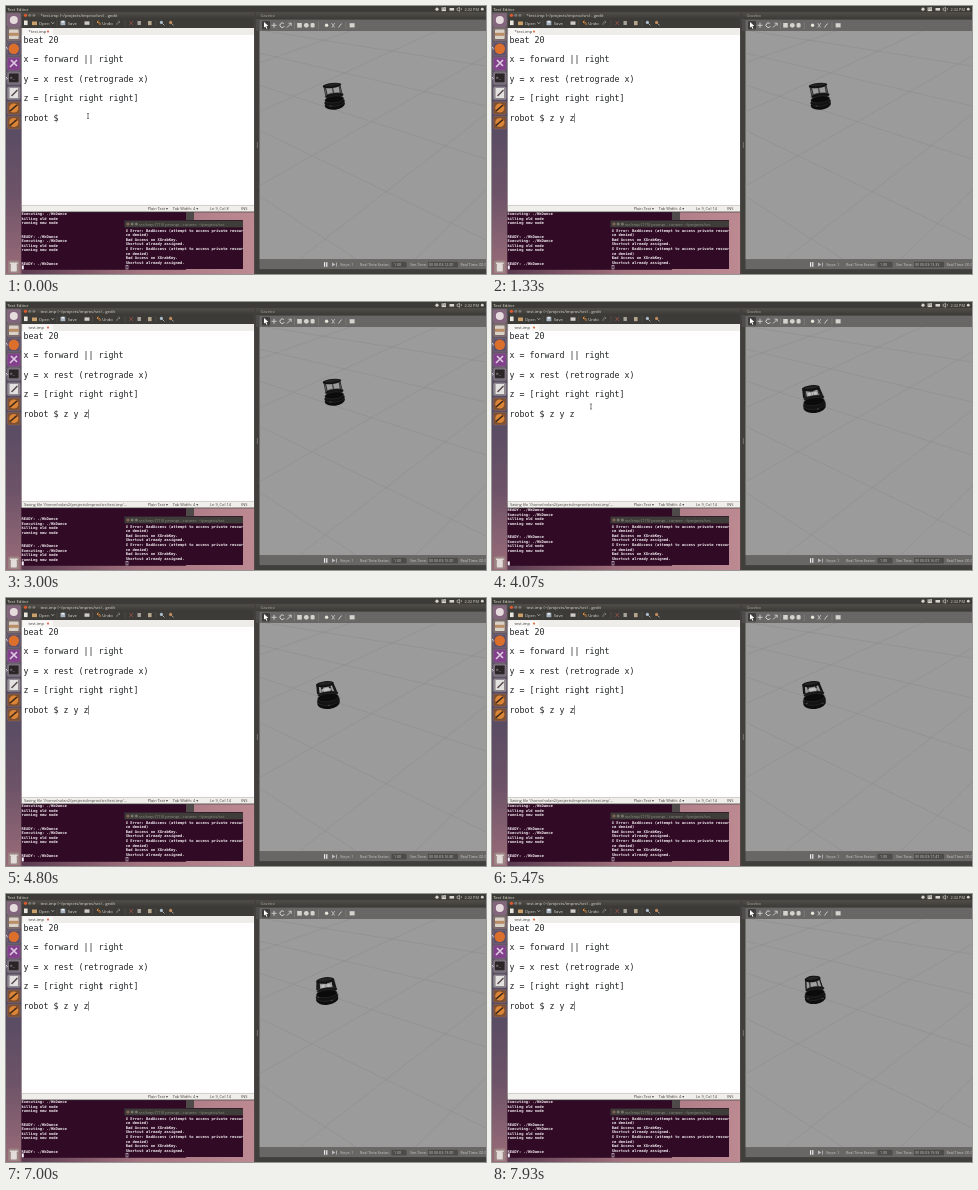
These frames come from a looping animation (480x268 px, 8 s). An HTML page:

```html
<!DOCTYPE html>
<html lang="en">
<head>
<meta charset="utf-8">
<title>Live coding a robot</title>
<style>
html, body { margin: 0; width: 100%; height: 100%; overflow: hidden; background: #3c3b37; }
svg { display: block; width: 480px; height: 268px; }
text { white-space: pre; font-family: "Open Sans", "Noto Sans", sans-serif; }
.mono { font-family: "DejaVu Sans Mono", "Liberation Mono", monospace; }
#blink { animation: blink 8s step-end infinite; }
#mouse { animation: mouse 8s linear infinite; }
#log { animation: scroll 8s step-end infinite; }
@keyframes blink {
  0%, 32.5%, 47.5%, 62.5%, 77.5%, 92.5% { opacity: 0; }
  4.125%, 37.5%, 52.5%, 67.5%, 82.5%, 97.5%, 100% { opacity: 1; }
}
@keyframes mouse {
  0%, 4.12% { transform: translate(82px, 110px); opacity: 1; }
  4.13% { transform: translate(82px, 110px); opacity: 0; }
  48% { transform: translate(99px, 104.5px); opacity: 0; }
  48.01%, 54% { transform: translate(99px, 104.5px); opacity: 1; }
  56.6%, 100% { transform: translate(95px, 92.5px); opacity: 1; }
}
@keyframes scroll {
  0% { transform: translateY(0); }
  32.5% { transform: translateY(-4.5px); }
  33.75% { transform: translateY(-13.5px); }
  45% { transform: translateY(-22.5px); }
  55%, 100% { transform: translateY(-27px); }
}
</style>
</head>
<body>
<svg id="stage" viewBox="0 0 480 268" xmlns="http://www.w3.org/2000/svg"></svg>
<script>
const LOOP = 8000;
const rect = (x, y, w, h, fill, more = '') =>
  `<rect x="${x}" y="${y}" width="${w}" height="${h}" fill="${fill}" ${more}/>`;
const disc = (x, y, r, fill) => `<circle cx="${x}" cy="${y}" r="${r}" fill="${fill}"/>`;
const text = (x, y, s, size, fill, more = '') =>
  `<text x="${x}" y="${y}" font-size="${size}" fill="${fill}" ${more}>${s}</text>`;
const mono = (x, y, s, size, fill, more = '') => text(x, y, s, size, fill, 'class="mono" ' + more);
const path = (d, color, width = 0.7) =>
  `<path d="${d}" fill="none" stroke="${color}" stroke-width="${width}"/>`;
const buttons = (x, y, close) =>
  disc(x, y, 1.6, close) + disc(x + 4.2, y, 1.5, '#77756e') + disc(x + 8.4, y, 1.5, '#77756e');

function desktop() {
  return `<defs>
    <linearGradient id="wall" x2="0" y2="1"><stop stop-color="#6b5f66"/><stop offset=".4" stop-color="#544a62"/><stop offset=".7" stop-color="#6d5368"/><stop offset="1" stop-color="#9a6c78"/></linearGradient>
    <linearGradient id="low"><stop stop-color="#5a3a50"/><stop offset=".5" stop-color="#a3737f"/><stop offset="1" stop-color="#bd8a92"/></linearGradient>
    <linearGradient id="bar" x2="0" y2="1"><stop stop-color="#504e48"/><stop offset="1" stop-color="#3c3b37"/></linearGradient>
    <clipPath id="logClip"><rect x="15" y="206" width="104" height="53.8"/></clipPath>
    <clipPath id="view"><rect x="253.5" y="25" width="226.5" height="228.5"/></clipPath></defs>`
    + rect(0, 0, 480, 268, 'url(#wall)') + rect(15.4, 200, 233, 68, 'url(#low)')
    + rect(0, 0, 480, 6.3, '#3c3b37')
    + text(1.2, 4.7, 'Text Editor', 4.3, '#dfdbd2')
    + disc(431, 3.2, 1.6, '#d8d4cb')
    + rect(435.6, 1.3, 4.4, 3.8, '#d8d4cb') + text(436.2, 4.4, 'En', 2.9, '#3c3b37')
    + rect(443.5, 2, 4.6, 2.6, '#d8d4cb') + path('M451 2.3v2h1l1.5 1v-4l-1.5 1zM455 2q1 1.2 0 2.4', '#d8d4cb', .6)
    + text(458.6, 4.8, '2:32 PM', 3.8, '#dfdbd2') + disc(476.3, 3.2, 1.4, '#d8d4cb');
}

function launcher() {
  const tile = (y, fill) => rect(1.4, y - 6.2, 12.8, 12.8, fill, 'rx="1.6" stroke="#b9a5ac" stroke-opacity=".35" stroke-width=".5"');
  return tile(14, '#82647c') + disc(7.8, 14, 4, '#e6dcde')
    + tile(28, '#7a6a68') + rect(3, 23.6, 9.6, 9.4, '#d9d2c8', 'rx=".8"') + rect(3, 26.8, 9.6, 3, '#b98c66')
    + tile(42.8, '#5d506a') + disc(7.8, 42.8, 5.2, '#dc6f2b')
    + tile(57.6, '#82408c') + path('M4 61l7-7M5 54l6 6', '#dcc9e0', 1.7)
    + tile(72, '#77707a') + rect(3, 67.5, 9.6, 8.8, '#2b2528', 'rx=".8"') + mono(4, 73, '&gt;_', 4, '#eee')
    + tile(87, '#8f8a90') + rect(3.6, 82, 8.4, 10, '#e4e2e0') + path('M5.5 90l6-6', '#55474c', 1.5)
    + [102, 116.5].map(y => tile(y, '#7d5034') + disc(7.8, y, 4.6, '#d98436') + path(`M4 ${y + 3}l7-6`, '#3a2518', 1.6)).join('')
    + rect(2.2, 254.5, 11.2, 12.5, '#9c8584', 'rx="1.6"') + rect(4.8, 258, 6, 7.5, '#e2dcda', 'rx=".8"')
    + rect(4, 256.6, 7.6, 1.2, '#f1eeec')
    + path('M0 41l1.3 1.3L0 43.6M0 71l1.3 1.3L0 73.6', '#eee', .8);
}

function terminals() {
  const block = ['Executing: ./HkDance', 'killing old node', 'running new node', '', '', 'READY: ./HkDance'];
  let log = '';
  for (let i = 0; i < 18; i++) log += mono(15.6, 209 + i * 4.5, block[i % 6], 3.75, '#f3eef1', 'font-weight="bold"');
  const err = ['X Error: BadAccess (attempt to access private resour', 'ce denied)', 'Bad Access on XGrabKey.', 'Shortcut already assigned.'];
  let side = '';
  for (let i = 0; i < 8; i++) side += mono(119.8, 225.7 + i * 4.56, err[i % 4], 3.75, '#f3eef1', 'font-weight="bold"');
  return rect(15.4, 206, 164.6, 57.8, '#310b26') + rect(180, 206, 8, 9, '#4f4a4a')
    + rect(118.5, 214, 118.5, 49, '#310b26')
    + `<g clip-path="url(#logClip)"><g id="log">${log}</g></g>`
    + rect(15.7, 259.4, 2.1, 4, '#f3eef1')
    + rect(118.5, 214.6, 118.5, 6.8, '#3e3d39') + buttons(122, 218, '#8a6254')
    + text(133, 219.5, 'src/tmp (115) prompt - runner: ~/projects/src', 4.1, '#8f8b83')
    + side + rect(120, 259.6, 2, 3.4, 'none', 'stroke="#f3eef1" stroke-width=".5"');
}

function editor() {
  const code = ['beat 20', 'x = forward || right', 'y = x rest (retrograde x)', 'z = [right right right]'];
  const ink = '#d9d5cb', sep = x => path(`M${x} 14v6.5`, '#5a5851', .5);
  return rect(15.6, 6.3, 232.6, 200, '#3c3b37') + rect(15.6, 6.3, 232.6, 6.2, 'url(#bar)')
    + buttons(19.5, 9.3, '#e2582f') + text(34.4, 10.6, '', 4.2, ink, 'id="title"')
    + rect(18, 14.5, 3.6, 4.6, '#e8e5de') + rect(26, 15.5, 5, 3.6, '#c9a06a') + text(32.8, 18.6, 'Open', 4.2, ink)
    + path('M45.5 16.3l1.3 1.4 1.3-1.4', ink) + sep(51)
    + rect(54.5, 14.8, 4.8, 4.4, '#a8b3c2') + rect(55.7, 14.8, 2.4, 1.8, '#ecebe8') + text(61.8, 18.6, 'Save', 4.2, ink)
    + rect(78.5, 15.4, 5, 3.4, '#cfccc5') + sep(86.5)
    + path('M94 19q1-3-3-3l1.4-1.4M91 16l1.4 1.4', '#d98a3c', 1) + text(96.2, 18.6, 'Undo', 4.2, ink)
    + path('M111 19q-1-3 3-3l-1.4-1.4M114 16l-1.4 1.4', '#7f7d74', .9) + sep(119)
    + path('M123.4 15l3.6 4M127 15l-3.6 4', '#a8564a') + rect(131.5, 15, 3.4, 4, '#a5a29a') + rect(142, 15, 3.6, 4.2, '#b5a58b') + sep(150)
    + disc(155.4, 16.4, 1.6, '#a9bac9') + path('M156.6 17.6l1.8 1.8', ink) + disc(164.6, 16.4, 1.6, '#c08a5c') + path('M165.8 17.6l1.8 1.8', ink)
    + rect(15.6, 22, 232.6, 7, '#efedea') + rect(17, 22.6, 30, 6.6, '#f8f7f5', 'rx="1"')
    + text(22.5, 27.1, '', 4.1, '#3c3b37', 'id="tab"') + disc(42, 25.6, 1.1, '#d9744a')
    + rect(15.6, 29, 232.6, 170.2, '#fff')
    + code.map((s, i) => mono(17.5, 36.8 + i * 19.5, s, 8.3, '#1f2224')).join('')
    + mono(17.5, 114.8, '', 8.3, '#1f2224', 'id="line"')
    + `<g id="blink">${rect(0, 107.4, .6, 9.2, '#333', 'id="caret"')}</g>`
    + rect(15.6, 199.2, 232.6, 6.4, '#f0eeeb') + path('M15.6 199.4h232.6', '#d0cdc7', .4)
    + text(18, 204.2, '', 3.9, '#44423e', 'id="status"')
    + text(141.8, 204.2, 'Plain Text ▾', 3.9, '#44423e') + text(166.8, 204.2, 'Tab Width: 4 ▾', 3.9, '#44423e')
    + text(204, 204.2, '', 3.9, '#44423e', 'id="pos"') + text(235.2, 204.2, 'INS', 3.9, '#44423e')
    + `<g id="mouse">${path('M-1.1-2.4h2.2M0-2.4v4.8M-1.1 2.4h2.2', '#333', .6)}</g>`;
}

function simulator() {
  const icon = '#d5d3ce';
  // floor lines: each entry is x1, y1, x2, y2
  const lines = [
    [253, 24, 480, 60], [253, 47, 480, 100], [253, 79, 480, 153], [253, 124, 480, 234], [253, 190, 352, 254],
    [253, 57, 344, 25], [253, 106, 430, 25], [253, 180, 480, 50], [292, 254, 480, 108], [408, 254, 480, 184]
  ].map(([a, b, c, d]) => `M${a} ${b}L${c} ${d}`).join('');
  return rect(248.2, 6.3, 231.8, 261.7, '#403f3b') + rect(250, 6.3, 230, 6.6, 'url(#bar)')
    + text(254.5, 11, 'Gazebo', 4.1, '#a5a097')
    + rect(250, 13, 230, 12, '#4d4c4a') + rect(253.5, 14, 226.5, 11, '#686765')
    + rect(256, 15, 8, 8.6, '#3f3e3c', 'rx="1"') + `<path d="M258 16l4.4 4h-2l1 2.4-1 .4-1-2.4-1.4 1.2z" fill="#fff"/>`
    + path('M265.5 19.3h5M268 16.8v5', icon, .9) + path('M277.8 17.5a2.3 2.3 0 1 0 .6 2.6', icon, 1)
    + path('M281 21.5l4-4M282.6 17.2h2.6v2.6', icon, .9) + path('M288.5 16v7M312.5 16v7M340 16v7', '#8b8985', .5)
    + rect(291.2, 17, 4.6, 4.6, icon) + disc(300.3, 19.3, 2.4, icon) + rect(304.6, 17, 4, 4.6, icon, 'rx="1.4"')
    + disc(320.6, 19.3, 1.7, '#e7e4d8') + path('M325.6 17l3 4.5M328.8 17l-3 4.5', icon, .7) + path('M332.5 21.5l3-4', icon, .9)
    + rect(343.6, 17.2, 5, 4.2, icon)
    + rect(253.5, 25, 226.5, 228.5, '#9b9b9b')
    + `<g clip-path="url(#view)">${path(lines, '#8c8c8c', .55)}<g id="robot"></g></g>`
    + disc(251.3, 137, .5, '#bbb') + disc(251.3, 139, .5, '#bbb') + disc(251.3, 141, .5, '#bbb')
    + rect(253.5, 253.5, 226.5, 9.6, '#686765')
    + rect(318, 256.2, 1.2, 4.6, '#eee') + rect(320.2, 256.2, 1.2, 4.6, '#eee')
    + `<path d="M326 256.5l3.4 2-3.4 2z" fill="#bbb"/>` + rect(330, 256.5, .8, 4, '#bbb')
    + text(334, 260, 'Steps: 1', 3.7, '#cbc8c1') + text(354, 260, 'Real Time Factor:', 3.7, '#cbc8c1')
    + rect(385.5, 255.8, 15, 5.6, '#4d4c4a') + text(388, 260, '1.00', 3.6, '#c9c6bf')
    + text(404, 260, 'Sim Time:', 3.7, '#cbc8c1')
    + rect(422, 255.8, 30, 5.6, '#4d4c4a') + text(423, 260, '', 3.6, '#c9c6bf', 'id="clock"')
    + text(454.5, 260, 'Real Time: 00 00:03', 3.7, '#cbc8c1');
}

const $ = id => document.getElementById(id);
$('stage').innerHTML = desktop() + terminals() + launcher() + editor() + simulator();

const keys = [[330, ' '], [400, 'z'], [670, ' '], [800, 'y'], [1000, ' '], [1330, 'z']];

// time, top x y rx ry, base x y rx ry, wall strength, turn
const poses = [
  [0, 326, 79.5, 9.4, 2.5, 328.8, 97, 10.2, 5.2, 0, 0],
  [3030, 326, 79.5, 9.4, 2.5, 328.8, 97, 10.2, 5.2, 0, 0],
  [3400, 319, 86.2, 8.9, 3, 322.6, 103.2, 11.3, 6.3, 1, 1.2],
  [4600, 319, 86.2, 8.9, 3, 322.6, 103.2, 11.3, 6.3, 1, 1.2],
  [5470, 319.2, 86.2, 9, 3, 322.6, 103.2, 11.4, 6.3, .9, 2.6],
  [7000, 319.4, 86.4, 9, 3.2, 321.2, 103.3, 11.2, 6, 1, 5.2],
  [7600, 320, 86, 8.4, 3.3, 322.3, 103, 10.8, 6, .6, 6.2],
  [7930, 320.6, 85, 8, 3.2, 323.3, 102.6, 10.5, 5.9, .15, 6.8],
  [8000, 320.6, 85, 8, 3.2, 323.3, 102.6, 10.5, 5.9, .15, 6.9]
];

function poseAt(t) {
  let i = 1;
  while (poses[i][0] < t) i++;
  const a = poses[i - 1], b = poses[i], k = (t - a[0]) / (b[0] - a[0]);
  return a.map((v, j) => v + (b[j] - v) * k);
}

function drawRobot(t) {
  const [, tx, ty, trx, try_, bx, by, brx, bry, wall, turn] = poseAt(t);
  const mx = tx + (bx - tx) * .72, my = ty + (by - ty) * .58;
  const oval = (x, y, rx, ry, fill, more = '') =>
    `<ellipse cx="${x}" cy="${y}" rx="${rx}" ry="${ry}" fill="${fill}" transform="rotate(-7 ${x} ${y})" ${more}/>`;
  const edge = 'stroke="#3a3a3a" stroke-width=".4"';
  let s = '';
  for (let i = 0; i < 6; i++) {
    const a = turn + .45 + i * Math.PI / 3, c = Math.cos(a) * .88, d = Math.sin(a) * 1.5;
    s += path(`M${tx + c * trx} ${ty + d}L${mx + c * brx * .86} ${my + d}`, i % 3 ? '#2a2a2a' : '#111', .6 + wall * .4);
  }
  s += oval((tx + mx) / 2, (ty + my) / 2 + .8, 5, 2, '#d0d0d0', `opacity="${wall * .7}"`);
  for (const side of [-1, 1])
    s += `<path d="M${tx + side * trx * .86} ${ty}L${mx + side * brx * .82} ${my}" stroke="#161616" stroke-width="${.8 + wall * 1.7}"/>`;
  s += oval(mx + .3, my, brx * .9, 2.7, '#141414', edge)
    + oval(bx, by + 1.5, brx, bry, '#0d0d0d')
    + oval(bx - .2, by - 1, brx, bry * .82, '#121212', edge)
    + oval(bx - .5, by - 3.6, brx * .93, bry * .65, '#0b0b0b', edge);
  for (let i = 0; i < 3; i++) {
    const a = turn + i * 2.1;
    if (Math.sin(a) > 0) s += rect(bx + Math.cos(a) * brx * .8 - 1, by + Math.sin(a) * bry * .65 - .4, 2, .9, '#4a4a4a');
  }
  s += oval(tx, ty, trx, try_, '#121212') + oval(tx, ty - .7, trx * .8, try_ * .45, '#242424');
  $('robot').innerHTML = s;
}

function setText(id, s) {
  if ($(id).textContent !== s) $(id).textContent = s;
}

function frame() {
  const t = performance.now() % LOOP;
  const saved = t >= 2400, name = (saved ? '' : '*') + 'test.imp';
  const typed = 'robot $' + keys.filter(k => t >= k[0]).map(k => k[1]).join('');
  setText('line', typed);
  $('caret').setAttribute('x', 17.2 + typed.length * 4.997);
  setText('pos', `Ln 9, Col ${typed.length + 1}`);
  setText('title', name + ' (~/projects/improv/src) - gedit');
  setText('tab', name);
  setText('status', saved && t < 6000 ? "Saving file '/home/nolan2/projects/improv/src/test.imp'…" : '');
  setText('clock', '00 00:03:' + (12 + t / 1000).toFixed(2));
  drawRobot(t);
  requestAnimationFrame(frame);
}
frame();
</script>
</body>
</html>
```
